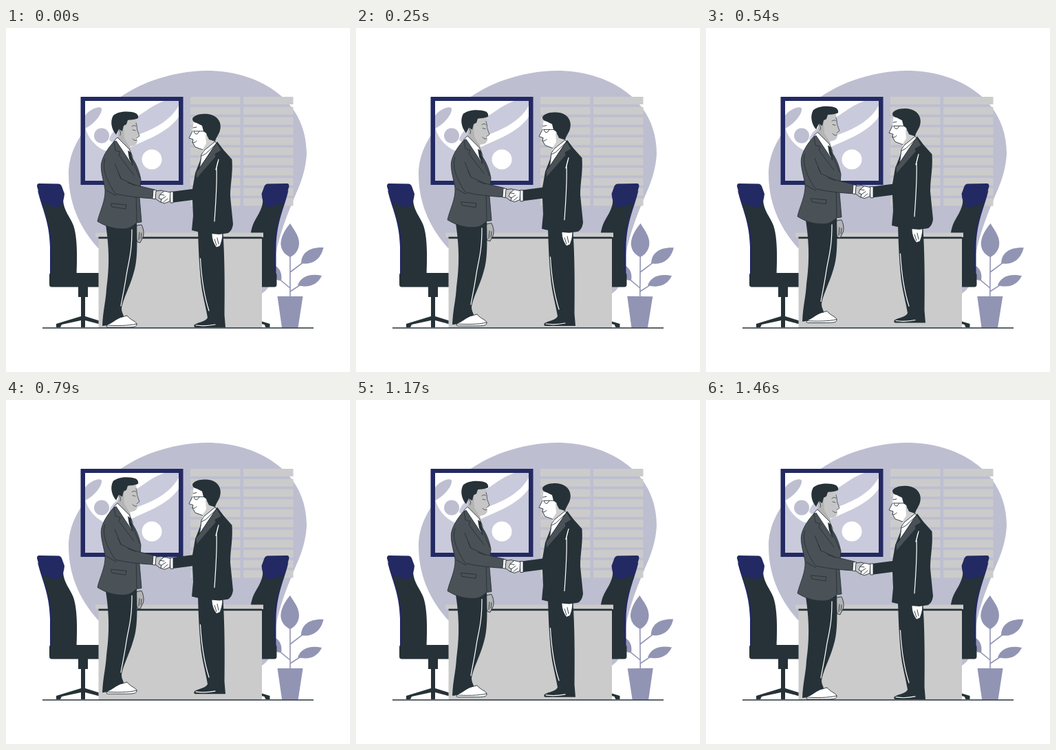
Recreate the animation shown at these times as an HTML page. Size 500 px wide and 500 px high, loop 1.5 s.

```html
<!DOCTYPE html>
<html lang="en">
<head>
<meta charset="utf-8">
<title>Handshake</title>
<style>
  html, body { margin: 0; width: 100%; height: 100%; overflow: hidden; background: #fff; }
  svg { display: block; width: 100%; height: 100%; }
  .dark { fill: #263238; }
  .navy { fill: #232962; }
  .tint { fill: #bdbed0; }
  .pale { fill: #c9cadb; }
  .grey { fill: #cbcbcb; }
  .leaf { fill: #9294b4; }
  .suit { fill: #4b5257; }
  .white { fill: #fff; }
  .skin { fill: #c6c6c6; }
  .shade { fill: #b4b4b5; }
  .line { fill: none; stroke: #263238; stroke-width: .9; stroke-linecap: round; stroke-linejoin: round; }
  .edge { stroke: #263238; stroke-width: .9; stroke-linejoin: round; }
  .crease { fill: none; stroke: #fff; stroke-width: 1.2; stroke-linecap: round; }
  .stem { fill: none; stroke: #9294b4; stroke-width: 1.6; }
</style>
</head>
<body>
<svg viewBox="0 0 500 500">
  <defs>
    <clipPath id="canvas"><path d="M115 106H251V222H115Z"/></clipPath>
    <g id="chair">
      <path class="navy" d="M46 236C52 262 63 280 64 318V360H72V300L56 246Z"/>
      <path class="dark" d="M53 254C60 280 67 292 67 325L66 360H102.500C104 325 103 302 98 287C93 274 84 266 83 250Z"/>
      <path class="navy" d="M48 226L77 226.500Q80 227 81 230L85 241Q84 252 80 259Q71 262 60 257Q53 255 51 251L45 230Q45 226 48 226Z"/>
      <path class="dark" d="M66 356H140V376.500H66Q63 376 63 373V359Q63 356 66 356ZM105 376H119V391H115V419L150 430V435H143L142 432L115 425V435H109V425L81 431L79 435H73V430L109 419V391H105Z"/>
    </g>
  </defs>

  <path class="tint" d="M91 213C91 150 157 98 210 77.500C240 66.500 268 62 292 62C362 62 437 100 437 183C435 215 424 234 414 259C402 288 390 325 390 350C388 370 381 380 372 386L134 320C113 297 91 261 91 213Z"/>
  <g id="blinds" class="grey"></g>

  <path class="navy" d="M108.500 100H257.500V228H108.500Z"/>
  <g clip-path="url(#canvas)">
    <path class="white" d="M115 106H251V222H115Z"/>
    <g class="pale">
      <path d="M251 106H230C210 113 198 126 181 134C164 142 152 152 150 162C154 172 178 162 190 156C214 147 238 136 251 113Z"/>
      <path d="M115 144C119 160 130 172 143 178C165 180 179 175 190 169C216 158 238 148 251 129V222H115Z"/>
    </g>
    <g class="tint">
      <path d="M115 127C122 118 136 112 139 117C140 125 128 140 115 146Z"/>
      <circle cx="139" cy="156.500" r="11"/>
    </g>
    <circle class="white" cx="212" cy="191" r="14.500"/>
  </g>

  <g id="plant">
    <path class="stem" d="M413 392V328M413 355L434 339M413 383L430 372M413 378L396 364"/>
    <g class="leaf">
      <path d="M413 284C401 298 398 311 400 318C402 327 409 331 413 333C418 331 426 324 426 313C426 302 419 294 413 284Z"/>
      <path d="M429 342C429 327 441 318 461.500 319C458 335 446 345 429 342Z"/>
      <path d="M424 374C428 362 441 356 459 360C452 374 440 378 424 374Z"/>
      <path d="M385 344C397 345 402 356 400 367C391 368 385 360 385 344Z"/>
      <path d="M394.500 390H431.500L424.500 435.500H401Z"/>
    </g>
  </g>

  <use href="#chair"/>
  <use href="#chair" transform="matrix(-1 0 0 1 456.500 0)"/>

  <path class="grey" d="M130 297.500H374V304H372V436H134.500V304H130Z"/>
  <path class="dark" d="M134.500 303.400H372V306.200H134.500Z"/>

  <g id="people">
    <!-- man on the left -->
    <path class="shade edge" d="M190 287L197 286C200 292 201 299 199 304L195 312L191 311C188 304 188 296 190 287Z"/>
    <path class="line" d="M194 297L193 308M197 298L196 306"/>
    <path class="white edge" d="M146 434C146 430 151 428 165 421L176 418C181 425 190 426 190 431C190 435 182 435 170 435H148Z"/>
    <path class="line" d="M146 432C160 433 178 433 190 430"/>
    <path class="dark" d="M144 280L190 283C191 320 191 340 185 358C180 376 170 394 168 407C168 414 171 416 171 420C160 421 153 433 140 433C141 410 145 398 146 379C150 350 151 322 144 280Z"/>
    <path class="crease" d="M183 293C183 328 178 340 175 359C172 379 169 392 167 404"/>
    <path class="shade" d="M164 145L175 132L184 150L180 172L183 184L161 172Z"/>
    <path class="skin" d="M175 134L188 131C191 138 190 145 191 149L194 157L190 160L191 164C191 169 186 172 179 172L172 160L171 145Z"/>
    <path class="line" style="stroke-width:.7" d="M189 138C191 144 190 146 191 149L194 157L190 160M184 161Q187 165 190 163M184 148L188 149M183 143Q187 140 189 143M164 148Q168 150 166 156"/>
    <path class="dark" d="M160 155C153 147 151 135 156 127C164 121 179 120 189 124Q193 127 192 131C186 134 181 133 177 134L175 140L171 142L169 150L164 147Z"/>
    <path class="white edge" d="M157 164L162 159L179 176L184 187L183 198L175 192Z"/>
    <path class="dark" d="M177 178L182 181L183 187L187 206L179 190Z"/>
    <path class="suit edge" d="M156 166C150 173 142 183 139 195C136 206 143 225 144 235C145 251 136 267 133 281C143 287 154 292 170 292C180 292 184 288 190 283L197 282L194 247L196 220C193 205 188 195 182 187L184 200L160 164Z"/>
    <path class="line" d="M157 165L159 178L166 180L164 185L186 214M183 190L194 217M189 236L190 282M146 236L160 244M153 255L175 257L174 263L154 260Z"/>

    <!-- man on the right -->
    <path class="dark" d="M279 292H315C318 330 318 378 317.500 417L319 435H275Q272 434 274 431C281 427 290 427 293 421C291 408 286 390 284 375C282 355 280 335 279 292Z"/>
    <path class="crease" d="M282.500 335C284 362 287 386 295 411M276 432Q289 434 304 431"/>
    <path class="white edge" d="M300 288L313 288C316 299 315 307 311 317L306 319C301 313 299 306 299 298Z"/>
    <path class="line" d="M303 307L306 316M307 305L309 314"/>
    <path class="white" d="M273 134L304 137L302 168L304 174L284 192L286 177L275 173L271 166L272 162L266 160L271 150Z"/>
    <path fill="#cfcfd0" d="M290 155L303 158L303 170L289 180L286 176L291 168Z"/>
    <path class="dark" d="M271 132C273 126 287 123 298 126C309 129 314 139 311 149C309 156 305 159 304 165L295 162C294 159 292 157 291 153L287 150L285 142L277 138Q271 137 271 132Z"/>
    <path class="line" d="M273 150H290M273 150Q274 155 278 154L281 150M271 166Q274 168 277 164M272 145L277 144M271 150L266 160L272 162L271 166L275 173L286 177"/>
    <path class="white edge" d="M304 165L308 171L281 207L284 184L288 178Z"/>
    <path class="line" d="M284 186L290 183L305 169"/>
    <path class="dark" d="M307 165L316 177L328.500 191C330 213 326 225 326 245L330 285C329 292 327 295 323 298L310 300C293 299 280 297 270 294L272 273L271 250L240 254V238L271 234L275 211L284 188L281 204Z"/>
    <path class="suit edge" d="M306 167L313 178L304 183L305 187L277 219L276 210L281 204Z"/>
    <path class="crease" d="M309 191L306 203C307 228 305 250 303 281M305 206L308 194"/>

    <!-- joined hands -->
    <path class="suit edge" d="M144 190C139 205 147 223 159 241C176 245 196 247 214 248L216 235L187 228L167 219L158 197"/>
    <path class="line" d="M167 219L163 210M188 229L177 225"/>
    <path class="white edge" d="M214 235L219 236L217 249L213 248ZM238 238H243V254L239 254Z"/>
    <path class="skin edge" d="M218 237L226 236L236 240L238 247L231 254L224 253L217 248Z"/>
    <path class="white edge" d="M239 239L230 237L224 242L222 247L226 249L225 253L230 255L238 252Z"/>
    <path class="line" d="M226 249L232 245M229 253L235 248M224 242L230 243"/>
  </g>

  <path class="dark" d="M53 435.200H447V436.800H53Z"/>
</svg>
<script>
  const LOOP = 1500, FLOOR = 436, LIFT = 7.9, STRETCH = 0.005, SWAY = 0.5;
  const byId = id => document.getElementById(id);
  const people = byId('people'), plant = byId('plant');

  let slats = '';
  for (let row = 0; row < 11; row++)
    for (const x of [268, 345])
      slats += `<rect x="${x}" y="${100 + row * 14.75}" width="72.500" height="11"/>`;
  byId('blinds').innerHTML = slats;

  function draw() {
    const phase = performance.now() % LOOP / LOOP * 2 * Math.PI;
    const rise = (1 - Math.cos(phase)) / 2;
    people.setAttribute('transform',
      `translate(0 ${FLOOR - LIFT * rise}) scale(1 ${1 + STRETCH * rise}) translate(0 ${-FLOOR})`);
    plant.setAttribute('transform', `rotate(${SWAY * Math.sin(phase)} 413 360)`);
    requestAnimationFrame(draw);
  }
  draw();
</script>
</body>
</html>
```
